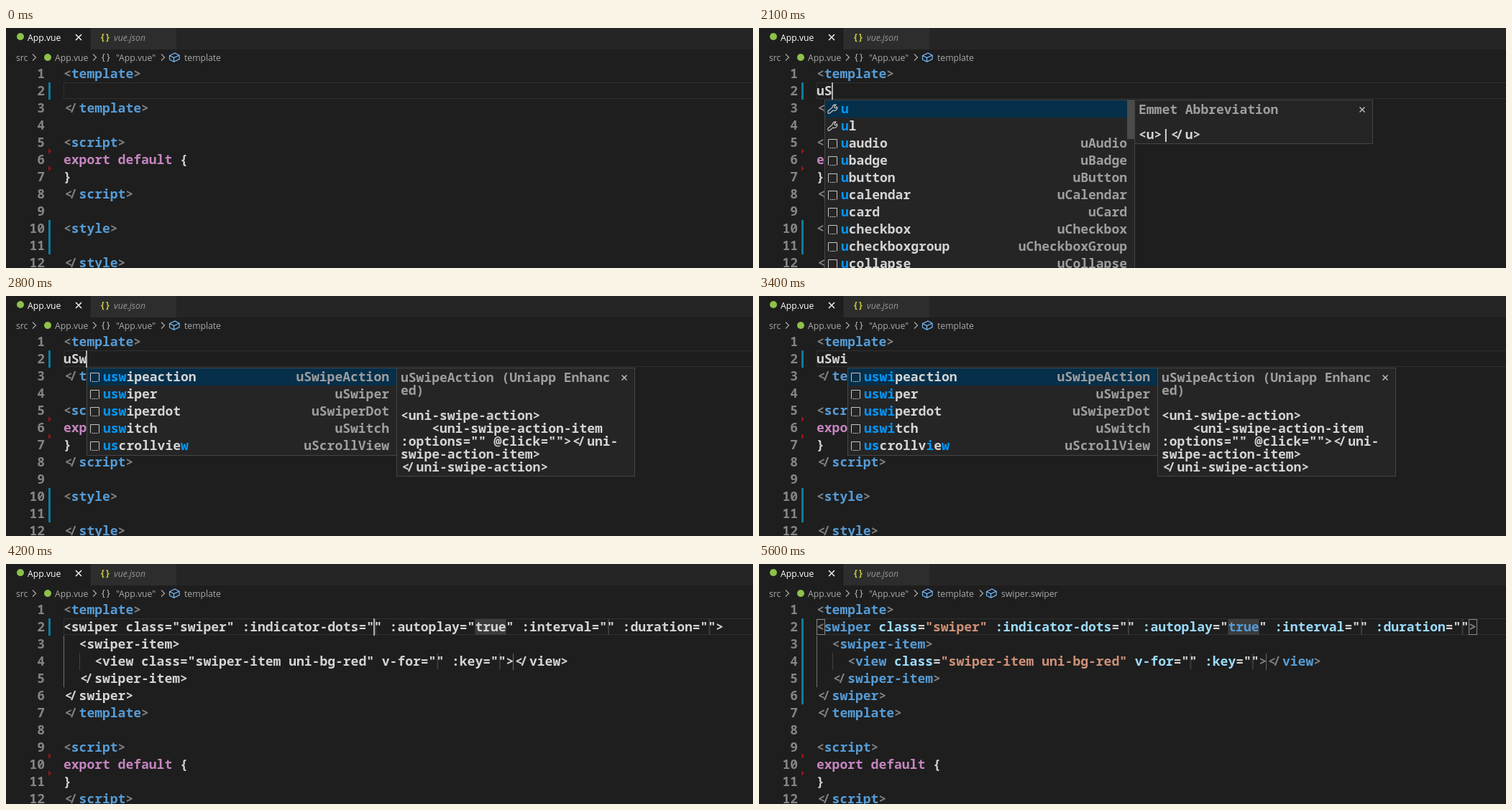
An HTML page with a canvas for the animation above (6200 ms loop, 1039 by 335 pixels).

```html
<!DOCTYPE html>
<html lang="en">
<head>
<meta charset="utf-8">
<title>Editor snippet completion</title>
<style>
  html, body { margin: 0; width: 100%; height: 100%; overflow: hidden; background: #1e1e1e; }
  canvas { display: block; }
</style>
</head>
<body>
<canvas id="stage" width="1039" height="335"></canvas>
<script>
const ctx = document.getElementById('stage').getContext('2d');
const LOOP = 6200, LEFT = 80, TOP = 52, ROW = 24, CHAR = 10.8;
const MONO = '18px "Noto Sans Mono", monospace';
const UI = '12.2px "Open Sans", sans-serif';
const TEXT = '#d4d4d4', DIM = '#9e9e9e', PANEL = '#252526', BORDER = '#454545';
const TOKEN_COLORS = ['#808080', '#569cd6', '#c586c0', '#9cdcfe', '#ce9178'];
// Groups: tag punctuation, tag name or literal, keyword, attribute, string
const TOKENS = /(<\/?|>)|((?<=<\/?)[\w-]+|true)|(export default)|(:?[\w-]+(?==))|((?<=class=)"[^"]*")|[^]/g;

const SNIPPET = [
  '<swiper class="swiper" :indicator-dots="" :autoplay="true" :interval="" :duration="">',
  '  <swiper-item>',
  '    <view class="swiper-item uni-bg-red" v-for="" :key=""></view>',
  '  </swiper-item>',
  '</swiper>'
];
const REST = ['</template>', '', '<script>', 'export default {', '}', '<\/script>',
  '', '<style>', '', '</style>'];

const SWIPE_ITEMS = ['uSwipeAction', 'uSwiper', 'uSwiperDot', 'uSwitch', 'uScrollView'];
const SWIPE_DOC = {
  title: ['uSwipeAction (Uniapp Enhanc', 'ed)'],
  body: ['<uni-swipe-action>', '    <uni-swipe-action-item', ':options="" @click=""></uni-',
    'swipe-action-item>', '</uni-swipe-action>']
};
const SWIPER_DOC = {
  title: ['uSwiper (Uniapp Enhanced)'],
  body: ['<swiper class="swiper"', ':indicator-dots=""', ':autoplay="true"',
    ':interval="" :duration="">', '    <swiper-item>', '        <view class="swiper-',
    'item uni-bg-red" v-for=""', ':key=""></view>', '    </swiper-item>', '</swiper>']
};
const POPUPS = [
  { from: 1700, to: 2200, query: 'u', selected: 0, thumb: 54,
    items: ['u', 'ul', 'uAudio', 'uBadge', 'uButton', 'uCalendar', 'uCard', 'uCheckbox',
      'uCheckboxGroup', 'uCollapse'],
    doc: { title: ['Emmet Abbreviation'], body: ['<u>|</u>'] } },
  { from: 2200, to: 2800, query: 'us', selected: 0, thumb: 200,
    items: ['uScrollView', 'uSearch', 'uSection', 'uSelect', 'uSlider', 'uSteps',
      'uSubsection', 'uSwipeAction', 'uSwiper', 'uSwiperDot'],
    doc: { title: ['uScrollView (Uniapp Enhance', 'd)'], body: ['<scroll-view></scroll-view>'] } },
  { from: 2800, to: 3000, query: 'usw', selected: 0, items: SWIPE_ITEMS, doc: SWIPE_DOC },
  { from: 3000, to: 3700, query: 'uswi', selected: 0, items: SWIPE_ITEMS, doc: SWIPE_DOC },
  { from: 3700, to: 4200, query: 'uswi', selected: 1, items: SWIPE_ITEMS, doc: SWIPER_DOC }
];
const CURSOR_ON = [[700, 1200], [1600, 2600], [2800, 3400], [3900, 4700], [5200, 5600]];

const within = (t, from, to) => t >= from && t < to;
const column = n => LEFT + n * CHAR;

function rect(x, y, w, h, color) {
  ctx.fillStyle = color;
  ctx.fillRect(x, y, w, h);
}

function frame(x, y, w, h, color) {
  ctx.strokeStyle = color;
  ctx.lineWidth = 1;
  ctx.strokeRect(x + 0.5, y + 0.5, w - 1, h - 1);
}

function label(str, x, y, color, font = `500 ${UI}`, align = 'left') {
  ctx.font = font;
  ctx.fillStyle = color;
  ctx.textAlign = align;
  ctx.fillText(str, x, y);
  ctx.textAlign = 'left';
}

// Monospaced text; the two glyphs of "</" move together like a ligature.
function code(str, x, y, color, weight = 600) {
  [...str].forEach((ch, i) => {
    const nudge = ch === '<' && str[i + 1] === '/' ? 1.5 : ch === '/' && str[i - 1] === '<' ? -2.5 : 0;
    label(ch, x + i * CHAR + nudge, y, color, `${weight} ${MONO}`);
  });
}

function icon(path, x, y, color, width = 1) {
  ctx.save();
  ctx.translate(x, y);
  ctx.strokeStyle = color;
  ctx.lineWidth = width;
  ctx.stroke(new Path2D(path));
  ctx.restore();
}

const cross = (x, y, r, color) => icon(`M${-r} ${-r}L${r} ${r}M${r} ${-r}L${-r} ${r}`, x, y, color, 1.4);
const chevron = x => icon('M-2-4.5L2.5 0L-2 4.5', x, 41, '#a9a9a9', 1.2);
const cube = x => icon('M-6.5-2.5L1-6L7-3V2.5L-.5 6L-6.5 3ZM-6.5-2.5L-.5.5L7-3M-.5.5V6', x, 41, '#75beff', 1.2);
const wrench = (x, y) => icon('M-6 3L0-2A4 4 0 0 1 5-6L2.5-3L4-1L6.5-3A4 4 0 0 1 1 2L-3.5 6Q-7 7-6 3Z', x, y, '#c5c5c5', 1.2);
const square = (x, y) => icon('M-6 6V-6H6V6M-4 6h2m1 0h2m1 0h2', x + 0.5, y + 0.5, '#c5c5c5');

function dot(x, y) {
  ctx.fillStyle = '#8dc149';
  ctx.beginPath();
  ctx.arc(x, y, 5, 0, 7);
  ctx.fill();
}

function drawHeader(t) {
  rect(0, 0, 1039, 30, PANEL);
  rect(0, 0, 117, 30, '#1e1e1e');
  rect(118, 0, 119, 30, '#2d2d2d');
  dot(20, 12);
  label('App.vue', 30, 18, '#ffffff');
  cross(101, 13, 4, '#ffffff');
  label('{', 132, 17, '#cbcb41', `bold ${UI}`);
  label('}', 139, 17, '#cbcb41', `bold ${UI}`);
  label('vue.json', 150, 18, '#969696', `italic 500 ${UI}`);

  const crumb = (str, x) => label(str, x, 46, '#a9a9a9');
  crumb('src', 14);
  dot(58, 41);
  crumb('App.vue', 68);
  label('{', 133, 45, '#cccccc');
  label('}', 140, 45, '#cccccc');
  crumb('"App.vue"', 153);
  cube(234);
  crumb('template', 248);
  [39, 123, 218].forEach(chevron);
  if (t >= 4600) {
    chevron(309);
    cube(323);
    crumb('swiper.swiper', 337);
  }
}

function drawGutter(t, inserted) {
  for (let n = 1; n <= 12; n++) {
    label(n, 54, TOP + n * ROW - 6, '#858585', `600 ${MONO}`, 'right');
  }
  const bar = (line, count) => rect(59, TOP + (line - 1) * ROW, 3, count * ROW, '#0c7d9d');
  bar(2, t >= 4400 ? 5 : 1);
  if (!inserted) bar(10, 2);

  const firstMark = inserted ? 268 : 172;
  ctx.fillStyle = '#94151b';
  for (const y of [firstMark, firstMark + ROW]) {
    ctx.beginPath();
    ctx.moveTo(59, y - 4);
    ctx.lineTo(63, y);
    ctx.lineTo(59, y + 4);
    ctx.fill();
  }
}

function drawSnippetMarks(t) {
  rect(LEFT, 100, 1, 3 * ROW, '#707070');
  rect(102, 124, 1, ROW, '#404040');
  const stop = (line, col, width = 2) =>
    rect(column(col) + (width > 2 ? 0 : 1), TOP + (line - 1) * ROW + 1, width, ROW - 2, '#3c3c3c');
  [40, 70, 83].forEach(col => stop(2, col));
  [48, 56].forEach(col => stop(4, col));
  stop(2, 53, 4 * CHAR);
  rect(705, 125, 1, 23, '#686868');
  if (t >= 4400) [80, 987].forEach(x => frame(x, 77, 12, 22, '#888888'));
}

function drawLine(str, y, plain) {
  if (plain) return code(str, LEFT, y, TEXT);
  for (const token of str.matchAll(TOKENS)) {
    const kind = token.slice(1).findIndex(Boolean);
    code(token[0], column(token.index), y, TOKEN_COLORS[kind] || TEXT);
  }
}

function drawPopup({ query, items, selected, thumb, doc }) {
  const x = Math.round(column(query.length));
  const height = items.length * ROW + 3;
  rect(x, 100, 432, height, PANEL);
  frame(x, 100, 432, height, BORDER);
  rect(x + 1, 101 + selected * ROW, 430, ROW, '#062f4a');
  if (thumb) rect(x + 421, 101, 10, thumb, '#4b4b4b');

  items.forEach((name, row) => {
    const y = 119 + row * ROW;
    const low = name.toLowerCase();
    const emmet = name.length < 3;
    (emmet ? wrench : square)(x + 11, y - 6);
    let prefix = 0;
    while (prefix < query.length && low[prefix] === query[prefix]) prefix++;
    [...low].forEach((ch, i) => {
      const hit = i < prefix || query.slice(prefix).includes(ch);
      code(ch, x + 23 + i * CHAR, y, hit ? '#0097fb' : TEXT, hit ? 700 : 600);
    });
    if (!emmet) code(name, x + 421 - name.length * CHAR, y, DIM);
  });

  const docX = x + 431, bodyY = 137 + doc.title.length * 18;
  const docHeight = bodyY + doc.body.length * 18 - 11 - 100;
  rect(docX, 100, 332, docHeight, PANEL);
  frame(docX, 100, 332, docHeight, BORDER);
  doc.title.forEach((str, i) => code(str, docX + 6, 120 + i * 18, DIM));
  doc.body.forEach((str, i) => code(str, docX + 6, bodyY + i * 18, TEXT));
  cross(x + 748, 114, 3.5, '#c5c5c5');
}

function typedText(t) {
  const keyTimes = [1600, 2000, 2800, 3000];
  return 'uSwi'.slice(0, keyTimes.filter(time => t >= time).length);
}

function draw(t) {
  const inserted = t >= 4200;
  const typed = typedText(t);
  const lines = ['<template>', ...(inserted ? SNIPPET : [typed]), ...REST].slice(0, 12);

  rect(0, 0, 1039, 335, '#1e1e1e');
  drawHeader(t);
  drawGutter(t, inserted);
  frame(LEFT, 76, 980, ROW - 1, '#303030');
  if (inserted) drawSnippetMarks(t);
  lines.forEach((str, i) =>
    drawLine(str, TOP + i * ROW + 18, within(t, 4200, 4300) && i > 0 && i < 6));

  if (CURSOR_ON.some(([from, to]) => within(t, from, to))) {
    const col = inserted ? 40 : typed.length;
    rect(Math.max(LEFT, Math.round(column(col) - 1)), 76, 2, ROW, '#aeafad');
  }
  const popup = POPUPS.find(({ from, to }) => within(t, from, to));
  if (popup) drawPopup(popup);
}

function tick() {
  draw(performance.now() % LOOP);
  requestAnimationFrame(tick);
}
tick();
</script>
</body>
</html>
```
